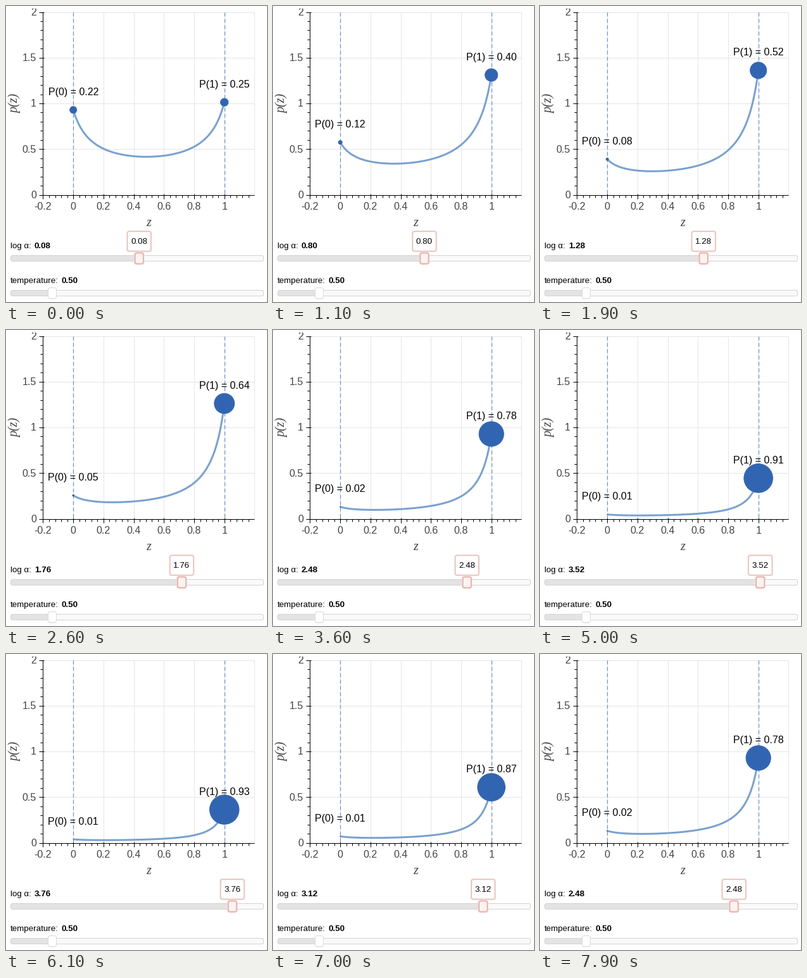
Animation of 412x468 px, one loop 8000 ms. Source, as a matplotlib script:

```python
import numpy as np
import matplotlib.pyplot as plt
from matplotlib.animation import FuncAnimation
from matplotlib.patches import Circle, FancyBboxPatch, Rectangle

W, H, DPI = 412, 468, 64
PX = 72 / DPI  # points per pixel
FRAMES, INTERVAL = 80, 100

# Hard concrete distribution: stretched to (GAMMA, ZETA), clipped to [0, 1]
BETA, GAMMA, ZETA = 0.5, -0.1, 1.1
STEP = 0.08

GRID, DARK = "#e5e5e5", "#444444"
BLUE, CURVE, DASH = "#3265b1", "#7aa1d0", "#6c95c8"
PINK, GRAY = "#e6a79f", "#d3d3d3"

# Slider drag: time in frames against slider position in steps
DRAG_T = [0, 11, 18, 26, 27, 36, 45, 50, 57, 58, 61, 63, 72, 79]
DRAG_K = [1, 10, 15.6, 22, 22, 31, 39, 44, 50, 50, 47, 44, 37, 31]


def sigmoid(x):
    return 1 / (1 + np.exp(-x))


def cdf(z, log_alpha):
    s = (z - GAMMA) / (ZETA - GAMMA)
    return sigmoid(BETA * np.log(s / (1 - s)) - log_alpha)


def density(z, log_alpha):
    s = (z - GAMMA) / (ZETA - GAMMA)
    q = cdf(z, log_alpha)
    return BETA * q * (1 - q) / (s * (1 - s) * (ZETA - GAMMA))


def sx(z):
    return 58.5 + (z + 0.2) * 238.5


def sy(p):
    return 298.5 - 144.5 * p


fig = plt.figure(figsize=(W / DPI, H / DPI), dpi=DPI, facecolor="white")
ax = fig.add_axes([0, 0, 1, 1])
ax.set_xlim(0, W)
ax.set_ylim(H, 0)
ax.axis("off")


def line(x0, y0, x1, y1, color="black", width=1, **kw):
    return ax.plot([x0, x1], [y0, y1], color=color, lw=width * PX,
                   solid_capstyle="butt", **kw)[0]


def text(x, y, s, size=16, color="black", ha="left", font="Liberation Sans", **kw):
    return ax.text(x, y, s, fontsize=size * PX, color=color, ha=ha,
                   va=kw.pop("va", "baseline"), family=font, **kw)


def box(x, y, w, h, fc="white", ec=GRAY, width=1, radius=3, **kw):
    patch = FancyBboxPatch((x, y), w, h, fc=fc, ec=ec, lw=width * PX,
                           boxstyle=f"round,pad=0,rounding_size={radius}", **kw)
    return ax.add_patch(patch)


def draw_axes():
    left, right, top, bottom = sx(-0.2), sx(1.2), sy(2), sy(0)
    for i in range(7):
        x = sx(-0.2 + 0.2 * i)
        line(x, top, x, bottom, GRID)
        line(x, bottom - 2, x, bottom + 6, zorder=3)
        text(x, 321.5, f"{-0.2 + 0.2 * i + 1e-9:.2g}" if i != 1 else "0",
             color=DARK, ha="center")
    for i in range(5):
        y = sy(0.5 * i)
        line(left, y, right, y, GRID)
        line(left - 6, y, left + 2, y, zorder=3)
        text(48, y + 5.3, f"{0.5 * i:g}", color=DARK, ha="right")
    line(right, top, right, bottom, GRID)
    for i in range(35):
        x = sx(-0.2 + 0.04 * i)
        line(x, bottom, x, bottom + 4, zorder=3)
    for i in range(21):
        y = sy(0.1 * i)
        line(left - 4, y, left, y, zorder=3)
    line(left, bottom, right, bottom, zorder=3)
    line(left, top, left, bottom, zorder=3)
    for z in (0, 1):
        line(sx(z), top, sx(z), bottom, DASH, 1.3, dashes=(4.6, 3.1), zorder=3)
    serif = dict(size=20, color=DARK, font="Liberation Serif", style="italic")
    text(225.4, 348, "z", ha="center", **serif)
    text(20, 154, "p(z)", ha="right", va="center", rotation=90,
         rotation_mode="default", **serif).set_position((24, 154))
    ax.add_patch(Rectangle((0, 0), W, 4, fc="white", ec="none", zorder=9))


def draw_slider(y, title, value_x):
    """Track centred on y; returns the value text and the filled part."""
    text(7, y - 16, title, 13.33)
    value = text(value_x, y - 16, "0.50", 13.33, weight="bold")
    box(7.5, y - 4.5, 399, 9, "#fafafa", "none")
    fill = box(7.5, y - 4.5, 65, 9, "#e3e3e3", "none")
    box(7.5, y - 4.5, 399, 9, "none", GRAY)
    return value, fill


def handle(cx, y, ec, fc, width):
    return box(cx - 6.5, y - 8.5, 13, 17, fc, ec, width, zorder=6)


draw_axes()

curve, = ax.plot([], [], color=CURVE, lw=3 * PX, solid_capstyle="butt", zorder=4)
dots = [ax.add_patch(Circle((sx(z), 0), 1, fc=BLUE, ec=BLUE, lw=PX, zorder=5))
        for z in (0, 1)]
labels = [text(sx(z), 0, "", ha="center", zorder=7) for z in (0, 1)]

alpha_value, alpha_fill = draw_slider(399, "log α:", 44.8)
draw_slider(454, "temperature:", 87.6)
box(66.5, 446.5, 13, 17, "#ececec", "none", zorder=5)
handle(73, 454, "#d9d9d9", "white", 1)

glow = box(0, 389.5, 15, 19, "none", "#f6dcd8", 1.5, zorder=5)
knob = handle(0, 399, PINK, "#faf3f1", 1.5)
tip_glow = box(0, 355.5, 39, 33, "none", "#f8e6e3", 1.5, zorder=5)
tip = box(0, 356.5, 37, 31, "white", "#e2b9b4", 1.3, zorder=6)
tip_text = text(0, 376.5, "", 13.33, ha="center", zorder=7)

zs = np.linspace(0, 1, 200)


def update(i):
    log_alpha = STEP * round(float(np.interp(i, DRAG_T, DRAG_K)))
    curve.set_data(sx(zs), sy(density(zs, log_alpha)))

    masses = cdf(0, log_alpha), 1 - cdf(1, log_alpha)
    for z, mass in enumerate(masses):
        y = sy(density(z, log_alpha))
        dots[z].center = sx(z), y
        dots[z].set_radius(25 * mass)
        labels[z].set_text(f"P({z}) = {mass:.2f}")
        labels[z].set_y(y - 23.3)

    x = 207 + 40 * log_alpha
    alpha_fill.set_width(x - 7.5)
    glow.set_x(x - 7.5)
    knob.set_x(x - 6.5)
    tip_glow.set_x(x - 19.5)
    tip.set_x(x - 18.5)
    tip_text.set_x(x)
    for t in (tip_text, alpha_value):
        t.set_text(f"{log_alpha:.2f}")
    return []


anim = FuncAnimation(fig, update, frames=FRAMES, interval=INTERVAL,
                     repeat=True, repeat_delay=0, blit=False)
plt.show()
```
